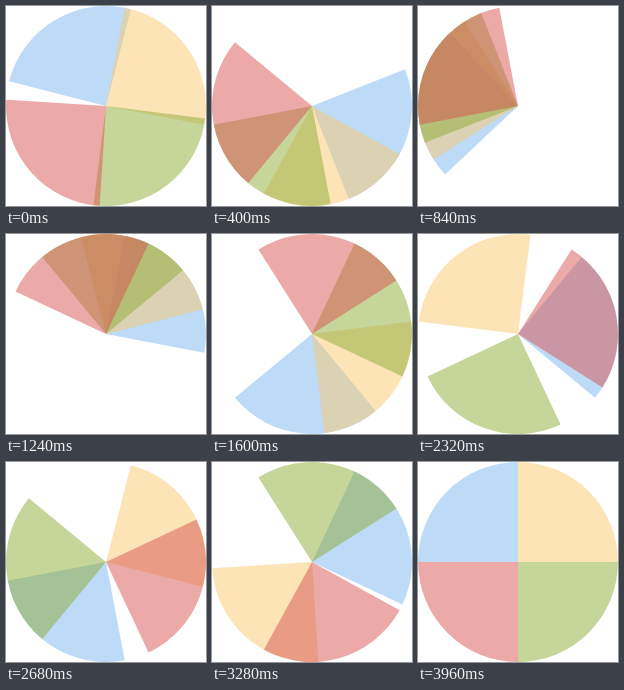
Animation of 200 by 200 pixels, one loop 4000 ms. Source, as an HTML page with a canvas:

```html
<!DOCTYPE html>
<html lang="en">
<head>
<meta charset="utf-8">
<title>Turning wedges</title>
<style>
  html, body { margin: 0; width: 100%; height: 100%; overflow: hidden; background: #fff; }
  canvas { display: block; width: 200px; height: 200px; }
</style>
</head>
<body>
<canvas id="stage"></canvas>
<script>
const SIZE = 200;
const LOOP = 4000;
const STEP = 40;
const QUARTER = Math.PI / 2;

// Back to front; start is the quarter turn of the leading edge at rest.
const wedges = [
  { color: 'rgb(125,181,239)', start: 2, turns: 4 },
  { color: 'rgb(249,201,113)', start: 3, turns: 3 },
  { color: 'rgb(141,171,55)', start: 0, turns: 2 },
  { color: 'rgb(215,84,82)', start: 1, turns: 1 }
];

const canvas = document.getElementById('stage');
const ctx = canvas.getContext('2d');
const ratio = window.devicePixelRatio || 1;
canvas.width = canvas.height = Math.round(SIZE * ratio);
ctx.scale(ratio, ratio);

function drawWedge({ color, start, turns }, phase) {
  const angle = start * QUARTER + turns * phase * 2 * Math.PI;
  const mid = SIZE / 2;
  ctx.fillStyle = color;
  ctx.beginPath();
  ctx.moveTo(mid, mid);
  ctx.arc(mid, mid, mid, angle, angle + QUARTER);
  ctx.closePath();
  ctx.fill();
}

function draw(time) {
  // The turn advances in even ticks, one tick ahead of the clock.
  const tick = Math.floor(((time + 0.5) % LOOP) / STEP) + 1;
  const phase = (tick * STEP / LOOP) % 1;
  ctx.globalAlpha = 1;
  ctx.fillStyle = '#fff';
  ctx.fillRect(0, 0, SIZE, SIZE);
  ctx.globalAlpha = 0.5;
  wedges.forEach(wedge => drawWedge(wedge, phase));
}

const origin = performance.now();
function loop() {
  draw(performance.now() - origin);
  requestAnimationFrame(loop);
}
loop();
</script>
</body>
</html>
```
